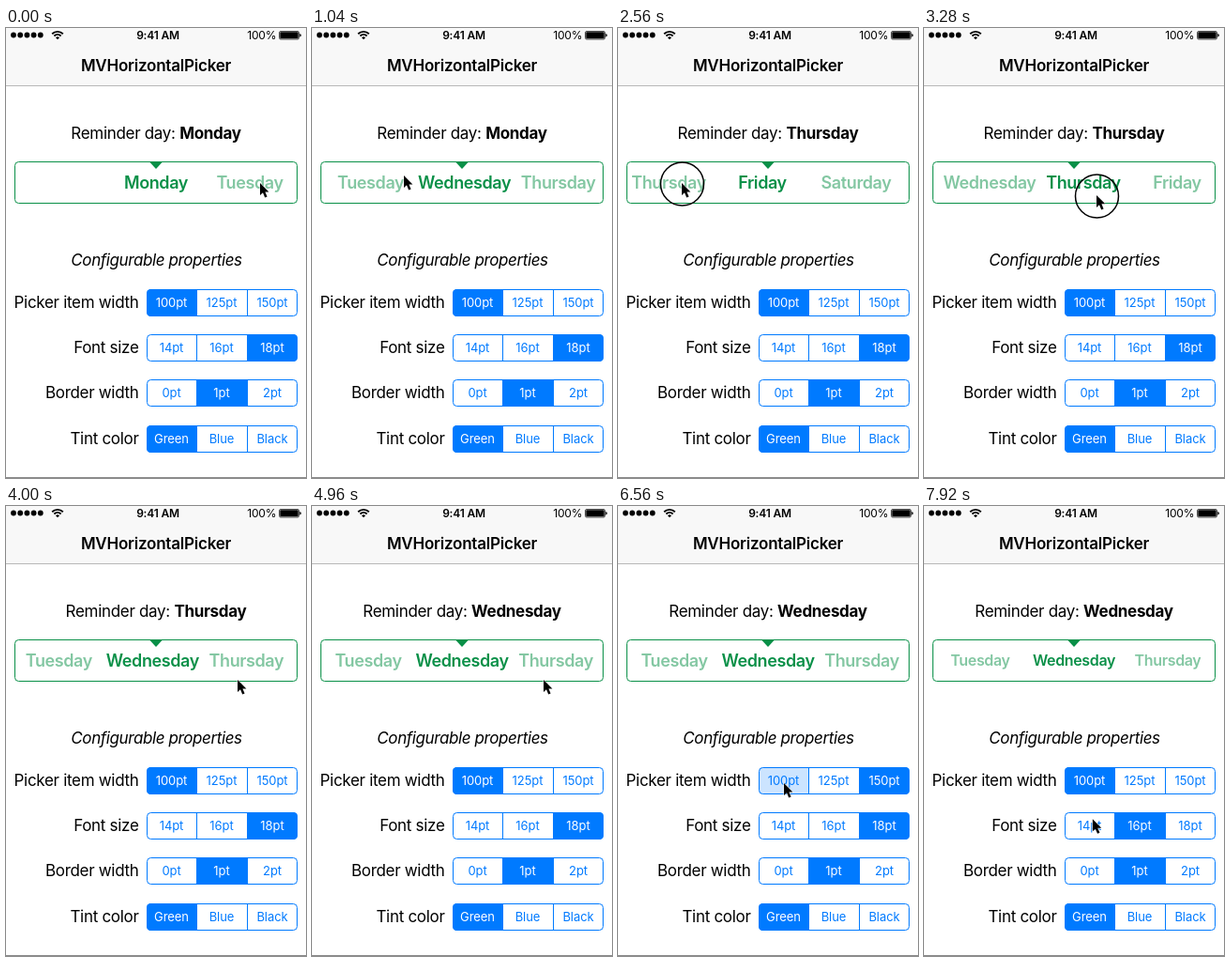
An HTML page for the animation above (8000 ms loop, 320 by 479 pixels).

```html
<!DOCTYPE html>
<html lang="en">
<head>
<meta charset="utf-8">
<title>MVHorizontalPicker</title>
<style>
  html, body { margin: 0; width: 100%; height: 100%; overflow: hidden; background: #fff; }
  svg { display: block; width: 100%; height: 100%; }
  text { font-family: Inter, Roboto, "Liberation Sans", sans-serif; font-size: 17px; letter-spacing: -.018em; fill: #000; }
  .mid { text-anchor: middle; }
  .end { text-anchor: end; }
  .semi { font-weight: 600; }
  .bold { font-weight: 700; }
  .title { letter-spacing: -.013em; }
  .note { font-style: italic; letter-spacing: -.023em; }
  .status { font-size: 12px; letter-spacing: -.015em; }
  .day { font-weight: 600; font-size: inherit; letter-spacing: -.022em; fill: #0a9048; text-anchor: middle; }
  .seg { font-size: 13px; letter-spacing: -.005em; text-anchor: middle; }
</style>
</head>
<body>
<svg viewBox="0 0 320 479" preserveAspectRatio="none">
  <defs>
    <clipPath id="inside"><rect x="10" y="143" width="300" height="43" rx="3.5"/></clipPath>
  </defs>
  <rect width="320" height="479" fill="#fff"/>
  <rect width="320" height="61" fill="#f8f8f8"/>
  <rect y="61" width="320" height="1" fill="#b8b8b8"/>
  <rect y="478" width="320" height="1" fill="#8a8a8a"/>

  <g id="dots"></g>
  <g fill="none" stroke="#000" stroke-width="1.9">
    <path d="M49.2 6.2A8.4 8.4 0 0 1 60.8 6.2"/>
    <path d="M51.4 8.5A5.2 5.2 0 0 1 58.6 8.5"/>
  </g>
  <path d="M55 12.2L53 10.2A2.9 2.9 0 0 1 57 10.2Z"/>
  <text class="status semi mid" x="162" y="11.8">9:41 AM</text>
  <text class="status end" x="288.3" y="11.8">100%</text>
  <rect x="291.5" y="3.5" width="21" height="8.5" rx="1.5" fill="none" stroke="#000" stroke-width=".7"/>
  <rect x="292.3" y="4.3" width="19.4" height="6.9" rx=".8"/>
  <path d="M313.3 6C315.4 6.4 315.4 9.1 313.3 9.5Z"/>

  <text class="title semi mid" x="160" y="45.7">MVHorizontalPicker</text>
  <text class="mid" x="160" y="118">Reminder day: <tspan class="bold" id="choice">Monday</tspan></text>
  <g clip-path="url(#inside)"><g id="days"></g></g>
  <rect x="9.5" y="142.5" width="301" height="44" rx="4" fill="none" stroke="#0a9048"/>
  <path d="M153.5 143H166.5L160 150Z" fill="#0a9048"/>
  <text class="note mid" x="160.5" y="253">Configurable properties</text>
  <g id="rows"></g>

  <circle id="touch" r="23" fill="none" stroke="#000" stroke-width="1.5"/>
  <path id="cursor" d="M0 0V13L3 10.3L5.2 15.5L7.6 14.5L5.4 9.4H9.4Z" stroke="#fff" paint-order="stroke"/>
</svg>
<script>
const LOOP = 8000, STEP = 80, GLIDE = 240, BLUE = '#007aff';
const DAYS = ['Monday', 'Tuesday', 'Wednesday', 'Thursday', 'Friday', 'Saturday', 'Sunday'];
const ROWS = [
  { name: 'Picker item width', options: ['100pt', '125pt', '150pt'], first: 0 },
  { name: 'Font size', options: ['14pt', '16pt', '18pt'], first: 2 },
  { name: 'Border width', options: ['0pt', '1pt', '2pt'], first: 1 },
  { name: 'Tint color', options: ['Green', 'Blue', 'Black'], first: 0 }
];
const edge = c => Math.floor(150 + c * 161 / 3);
const rowTop = r => Math.floor(278 + r * 48.34);

const drag = (start, end, from, to) => ({ start, end, from, to });
// A tap finds its row and column from where it lands.
const tap = (start, x, y) => ({
  start, end: start + 160, from: [x, y], to: [x, y],
  row: Math.round((y - 292) / 48), col: Math.floor((x - 150) / 54)
});

const drags = [
  drag(240, 760, [271, 165], [98, 157]),
  drag(1280, 1680, [205, 163], [112, 164]),
  drag(2080, 2560, [174, 165], [68, 165]),
  drag(2560, 3760, [68, 165], [247, 185])
];
const taps = [tap(5280, 228, 296), tap(5760, 288, 297), tap(6400, 177, 295), tap(7280, 228, 338), tap(7960, 176, 333)];
const gestures = [...drags, ...taps];

const $ = id => document.getElementById(id);
const during = (t, from, to) => t >= from && t < to;
const mix = (a, b, p) => a.map((v, i) => v + (b[i] - v) * p);

function ease(t, from, to) {
  const p = Math.min(1, Math.max(0, (t - from) / (to - from)));
  return p * p * (3 - 2 * p);
}

// The pointer rests after a gesture, then glides to the next one.
function pointerAt(t) {
  let at = gestures[0].from;
  for (const g of gestures) {
    at = mix(at, g.from, ease(t, g.start - GLIDE, g.start));
    if (t < g.start) break;
    at = mix(g.from, g.to, ease(t, g.start, g.end));
  }
  return at;
}

// Scroll follows the finger and decays to the nearest item on release;
// the choice changes once the scroll has come to rest.
function scrollAt(t) {
  let pos = 0, choice = 0;
  drags.forEach((g, i) => {
    if (t < g.start) return;
    pos -= (g.to[0] - g.from[0]) / 100 * ease(t, g.start, g.end);
    const next = drags[i + 1] ? drags[i + 1].start : LOOP;
    const free = Math.min(t, next) - g.end;
    if (free <= 0) return;
    const snap = Math.round(pos);
    pos = snap + (pos - snap) * Math.exp(-free / 120);
    if (free >= 400) choice = pos = snap;
  });
  return { pos, choice };
}

function selected(row, t) {
  const done = taps.filter(g => g.row === row && g.end <= t).pop();
  return done ? done.col : ROWS[row].first;
}

function add(parent, tag, attrs, text) {
  const el = document.createElementNS('http://www.w3.org/2000/svg', tag);
  for (const k in attrs) el.setAttribute(k, attrs[k]);
  if (text) el.textContent = text;
  parent.appendChild(el);
  return el;
}

for (let i = 0; i < 5; i++) add($('dots'), 'circle', { cx: 8 + i * 7.2, cy: 7.5, r: 2.9 });

const days = DAYS.map(name => add($('days'), 'text', { class: 'day' }, name));

const cells = ROWS.map(({ name, options }, r) => {
  const g = $('rows'), y = rowTop(r), height = 29;
  add(g, 'text', { class: 'end', x: 141.5, y: y + 20.3 }, name);
  const clip = add(g, 'clipPath', { id: 'clip' + r });
  add(clip, 'rect', { x: 150, y, width: 161, height, rx: 4.5 });
  const bar = add(g, 'g', { 'clip-path': `url(#clip${r})` });
  const parts = options.map((label, c) => {
    const x = edge(c), width = edge(c + 1) - x;
    const box = add(bar, 'rect', { x, y, width, height });
    if (c) add(bar, 'rect', { x, y, width: 1, height, fill: BLUE });
    return { box, text: add(bar, 'text', { class: 'seg', x: x + width / 2, y: y + 19.2 }, label) };
  });
  add(g, 'rect', { x: 150.5, y: y + .5, width: 160, height: height - 1, rx: 4, fill: 'none', stroke: BLUE });
  return parts;
});

function draw(t) {
  const { pos, choice } = scrollAt(t);
  const width = 100 + 25 * selected(0, t), size = 14 + 2 * selected(1, t);
  $('choice').textContent = DAYS[choice];
  $('days').style.fontSize = size + 'px';
  days.forEach((el, i) => {
    el.setAttribute('x', 160 + (i - pos) * width);
    el.setAttribute('y', 164.5 + size * .36);
    el.setAttribute('opacity', i === Math.round(pos) ? 1 : .5);
  });

  // Segments repaint one step after the picker.
  const pressed = taps.find(g => during(t, g.start, g.end + STEP));
  cells.forEach((parts, r) => parts.forEach(({ box, text }, c) => {
    const on = c === selected(r, t - STEP);
    const lit = pressed && pressed.row === r && pressed.col === c;
    box.setAttribute('fill', on ? BLUE : lit ? '#cce4ff' : '#fff');
    text.style.fill = on ? '#fff' : BLUE;
  }));

  const [x, y] = pointerAt(t);
  $('cursor').setAttribute('transform', `translate(${x} ${y})`);
  $('touch').setAttribute('transform', `translate(${x + .5} ${y + 1})`);
  $('touch').style.display = gestures.some(g => during(t, g.start, g.end)) ? '' : 'none';
}

const start = performance.now();
function tick() {
  const t = (performance.now() - start) % LOOP;
  draw(Math.floor(t / STEP) * STEP);
  requestAnimationFrame(tick);
}
tick();
</script>
</body>
</html>
```
